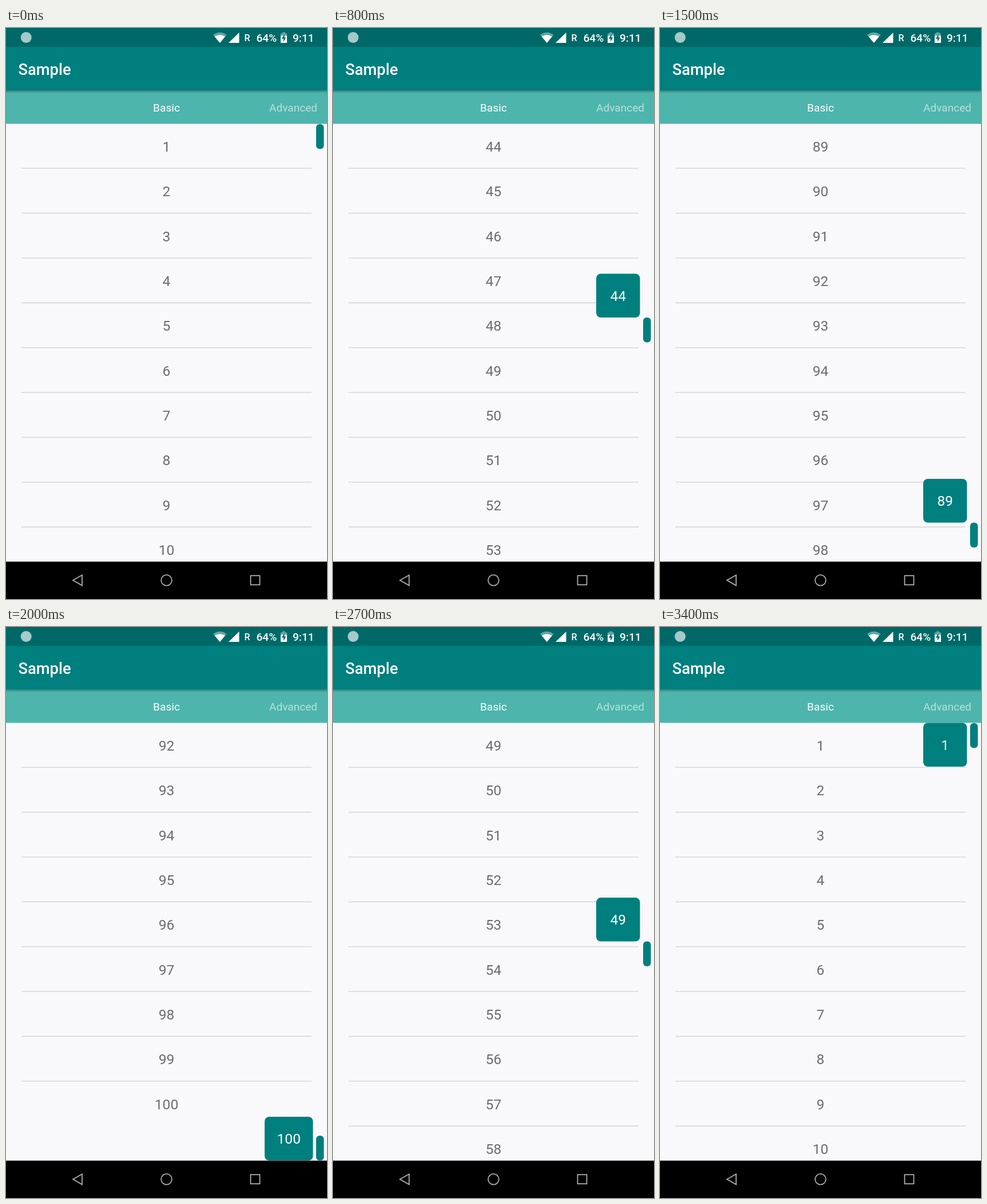
Animation, 561 px wide and 998 px high, one loop 4100 ms. Source, as an HTML page:

```html
<!DOCTYPE html>
<html lang="en">
<head>
<meta charset="utf-8">
<title>Fast scroll list</title>
<style>
  html, body { margin: 0; width: 100%; height: 100%; overflow: hidden; background: #f9f8fb; }
  svg { display: block; width: 561px; height: 998px; font-family: Roboto, sans-serif; }
  .medium { font-weight: 500; }
  .mid { text-anchor: middle; }
  #rows, #bubble { font-size: 24.5px; }
  #rows text { fill: #6c6c6e; }
  #rows path { stroke: #d8d7da; stroke-width: 1.6; }
</style>
</head>
<body>
<svg viewBox="0 0 561 998">
  <defs>
    <linearGradient id="shade" x2="0" y2="1">
      <stop stop-color="#000" stop-opacity=".3"/>
      <stop offset="1" stop-color="#000" stop-opacity="0"/>
    </linearGradient>
  </defs>
  <rect width="561" height="998" fill="#f9f8fb"/>
  <g id="rows"></g>

  <!-- tabs and app bar -->
  <rect y="109" width="561" height="58.5" fill="#4db5ac"/>
  <rect y="109" width="561" height="5" fill="url(#shade)"/>
  <rect y="33" width="561" height="76" fill="#007f7f"/>
  <g fill="#fff">
    <text class="medium" x="21.5" y="81.5" font-size="27.3">Sample</text>
    <g font-size="19.1">
      <text class="mid" x="280.5" y="146">Basic</text>
      <text class="mid" x="502" y="146" fill-opacity=".6">Advanced</text>
    </g>
  </g>

  <!-- status bar -->
  <rect width="561" height="33" fill="#006968"/>
  <circle cx="35.2" cy="16.5" r="9.5" fill="#a5cac9"/>
  <g fill="#fff">
    <path d="M373.8 26L362 12Q373.8 3.5 385.6 12Z" opacity=".4"/>
    <path d="M373.8 26L364.7 15Q373.8 9.5 382.9 15Z"/>
    <path d="M389 26H407.5V8Z"/>
    <text class="medium" x="416.5" y="22.6" font-size="16">R</text>
    <g class="medium" font-size="19.1">
      <text x="437.5" y="23.7">64%</text>
      <text x="501" y="23.7">9:11</text>
    </g>
    <path d="M480 14V9.5H483V7.5H488V9.5H491V14Z" opacity=".4"/>
    <path d="M480 13.5H491V26H480Z"/>
    <path d="M486.5 11L482 18.8H485V24L489.3 16.6H486.5Z" fill="#006968"/>
  </g>

  <!-- scroll handle -->
  <rect id="thumb" x="542" width="13.5" height="43.5" rx="6" fill="#007f7f"/>
  <g id="bubble">
    <rect height="76.5" rx="8" fill="#007f7f"/>
    <text class="mid" y="47" fill="#fff"></text>
  </g>

  <!-- navigation bar -->
  <rect y="932.7" width="561" height="66" fill="#000"/>
  <g fill="none" stroke="#adadad" stroke-width="1.8">
    <path d="M117 965.3L133 956.2V974.4Z"/>
    <circle cx="280.5" cy="965.3" r="9.4"/>
    <rect x="427.5" y="957.2" width="16" height="16"/>
  </g>
</svg>
<script>
const LOOP = 4100, STEP = 100, PITCH = 78.35, COUNT = 100;
const TOP = 167.5, BOTTOM = 932.5, THUMB = 43.5, BUBBLE = 76.5;

// finger height over time: [ms, y]
const drag = [[0, 168], [100, 168], [400, 245], [800, 506], [1200, 791], [1600, 889],
  [2000, 933], [2200, 933], [3000, 319.5], [3200, 225], [3400, 168], [LOOP, 168]];

const $ = id => document.getElementById(id);
const clamp = (v, lo, hi) => Math.min(hi, Math.max(lo, v));

$('rows').innerHTML = Array.from({ length: 10 }, (_, i) => {
  const y = TOP + i * PITCH;
  return `<g><text class="mid" x="280.5" y="${y + 48.4}"></text>
    <path d="M27 ${y + 77.8}H534"/></g>`;
}).join('');
const rows = [...$('rows').children];
const [box, label] = $('bubble').children;

function fingerAt(t) {
  const i = drag.findIndex(([end]) => end > t);
  const [t0, y0] = drag[i - 1], [t1, y1] = drag[i];
  return y0 + (y1 - y0) * (t - t0) / (t1 - t0);
}

function draw(t) {
  const y = fingerAt(t);
  const thumbY = clamp(y, TOP, BOTTOM - THUMB);
  const part = (thumbY - TOP) / (BOTTOM - THUMB - TOP);
  const first = Math.min(92, Math.floor(part * 92) + 1);

  rows.forEach((row, i) => {
    const n = first + i;
    row.children[0].textContent = n <= COUNT ? n : '';
    row.children[1].style.opacity = n < COUNT ? 1 : 0;
  });

  $('thumb').setAttribute('y', thumbY);
  const atEnd = part >= 1, width = atEnd ? 84.5 : 76.5;
  const bubbleY = clamp(y - BUBBLE, TOP, BOTTOM - BUBBLE);
  $('bubble').setAttribute('transform', `translate(${536.5 - width} ${bubbleY})`);
  $('bubble').style.opacity = t > 0 ? 1 : 0;
  box.setAttribute('width', width);
  label.setAttribute('x', width / 2);
  label.textContent = atEnd ? COUNT : first;
}

const start = performance.now();
function tick() {
  const t = (performance.now() - start) % LOOP;
  draw(Math.floor(t / STEP) * STEP);
  requestAnimationFrame(tick);
}
tick();
</script>
</body>
</html>
```
